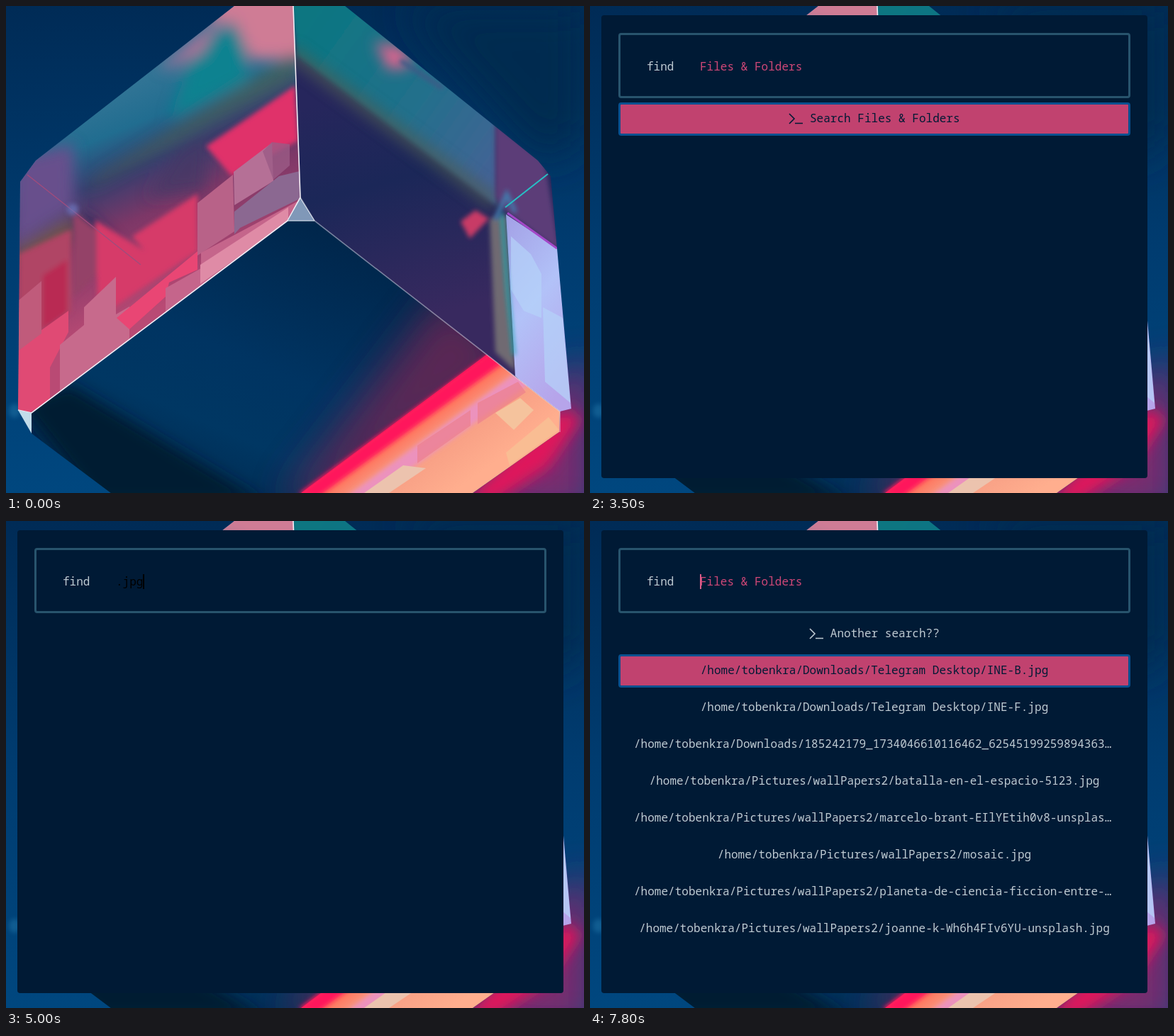
These frames come from a looping animation (815x687 px, 8 s). An HTML page:

```html
<!DOCTYPE html>
<html lang="en">
<head>
<meta charset="utf-8">
<title>File search menu</title>
<style>
  html, body { margin: 0; width: 815px; height: 687px; overflow: hidden; background: #00315f; }
  body { position: relative; font: 500 16.04px/22px "Noto Sans Mono", "DejaVu Sans Mono", monospace; white-space: pre; }
  .wall, .menu, .menu > * { position: absolute; }
  .wall { left: 0; top: 0; }
  .edge { fill: none; stroke: #f4eef6; stroke-width: 1.6; }

  .menu, .empty, .typed, .caret, .search, .results, .first, .second { animation: 8s step-end infinite; }
  .menu { left: 16px; top: 13px; width: 770px; height: 653px; border-radius: 4px; background: #001a35; color: #bfcad2; animation-name: open; }
  .field { box-sizing: border-box; left: 24px; top: 25px; width: 722px; height: 92px; border: 3px solid #28546d; border-radius: 4px; }
  .label { left: 64px; top: 61px; }
  .empty { left: 139px; top: 61px; color: #cf4777; animation-name: empty; }
  .caret { position: absolute; left: 0; top: 1px; width: 1.5px; height: 21px; background: #d95c88; animation-name: blink; }
  .typed { left: 139px; top: 61px; height: 22px; overflow: hidden; color: #000; animation-name: type; }
  .typed::after { content: ""; position: absolute; right: 0; top: 1px; width: 2px; height: 21px; background: #000; }

  .row { box-sizing: border-box; width: 722px; height: 47px; margin-bottom: 5px; border: 3px solid transparent; border-radius: 4px; line-height: 38px; text-align: center; }
  .cut { padding-left: 19px; text-align: left; }
  .row svg { width: 20px; height: 16px; vertical-align: -3px; fill: none; stroke: currentColor; stroke-width: 1.6; }
  .search, .results { left: 24px; top: 123px; }
  .search { animation-name: search; }
  .search .row, .first { border-color: #05508f; background: #c1426f; color: #001a35; }
  .results { animation-name: list; }
  .first { animation-name: leave; }
  .second { animation-name: enter; }

  @keyframes open { 0% { opacity: 0 } 16.25%, 100% { opacity: 1 } }
  @keyframes empty { 0%, 56.25%, 83.75%, 100% { opacity: 1 } 52.5%, 57.5% { opacity: 0 } }
  @keyframes search { 0%, 56.25% { opacity: 1 } 52.5%, 57.5%, 100% { opacity: 0 } }
  @keyframes blink { 0%, 47.5%, 100% { opacity: 1 } 43.75% { opacity: 0 } }
  @keyframes type {
    0%, 56.25%, 83.75%, 100% { opacity: 0; width: 0 }
    52.5%, 57.5% { opacity: 1; width: calc(1ch + 2px) }
    61.25% { opacity: 1; width: calc(3ch + 2px) }
    62.5% { opacity: 1; width: calc(4ch + 2px) }
  }
  @keyframes list { 0% { opacity: 0 } 83.75%, 100% { opacity: 1 } }
  @keyframes leave { 97.5%, 100% { border-color: transparent; background: none; color: #bfcad2 } }
  @keyframes enter { 97.5%, 100% { border-color: #05508f; background: #c1426f; color: #001a35 } }
</style>
</head>
<body>
<svg class="wall" width="815" height="687" viewBox="0 0 815 687">
  <defs>
    <linearGradient id="sky" x2="0" y2="1">
      <stop stop-color="#002b56"/><stop offset=".5" stop-color="#003c70"/><stop offset="1" stop-color="#00477f"/>
    </linearGradient>
    <linearGradient id="leftBase" gradientUnits="userSpaceOnUse" x1="170" y1="80" x2="300" y2="390">
      <stop stop-color="#3a7898"/><stop offset=".25" stop-color="#216d90"/>
      <stop offset=".42" stop-color="#343e6f"/><stop offset=".62" stop-color="#7c3767"/><stop offset="1" stop-color="#b94a74"/>
    </linearGradient>
    <linearGradient id="rightBase" gradientUnits="userSpaceOnUse" x1="500" y1="120" x2="590" y2="440">
      <stop stop-color="#26265c"/><stop offset=".4" stop-color="#1b2758"/><stop offset="1" stop-color="#38295f"/>
    </linearGradient>
    <linearGradient id="tealBand" gradientUnits="userSpaceOnUse" x1="420" y1="20" x2="700" y2="220">
      <stop stop-color="#0b7681"/><stop offset=".55" stop-color="#21708b"/><stop offset="1" stop-color="#436395"/>
    </linearGradient>
    <linearGradient id="glass" x2=".4" y2="1">
      <stop stop-color="#a3a0e6"/><stop offset=".5" stop-color="#b2c2f8"/><stop offset="1" stop-color="#b6a4ea"/>
    </linearGradient>
    <linearGradient id="floor" gradientUnits="userSpaceOnUse" x1="420" y1="300" x2="250" y2="690">
      <stop stop-color="#00264b"/><stop offset=".5" stop-color="#003462"/><stop offset=".75" stop-color="#003763"/><stop offset="1" stop-color="#002a50"/>
    </linearGradient>
    <linearGradient id="warm" gradientUnits="userSpaceOnUse" x1="550" y1="585" x2="625" y2="690">
      <stop stop-color="#ff1b5c"/><stop offset=".2" stop-color="#ff765f"/><stop offset=".4" stop-color="#f69c83"/><stop offset="1" stop-color="#ffae8e"/>
    </linearGradient>
    <filter id="soft2" x="-50%" y="-50%" width="200%" height="200%"><feGaussianBlur stdDeviation="3"/></filter>
    <filter id="soft9" x="-50%" y="-50%" width="200%" height="200%"><feGaussianBlur stdDeviation="10"/></filter>
    <filter id="soft30" x="-80%" y="-80%" width="260%" height="260%"><feGaussianBlur stdDeviation="28"/></filter>
    <clipPath id="leftFace"><path d="M322 0H405L415 270 397 303 36 574 17 570 20 248 42 218Z"/></clipPath>
    <clipPath id="rightFace"><path d="M405 0H478L750 218 768 240 797 568 781 572 435 303 415 270Z"/></clipPath>
    <clipPath id="floorFace"><path d="M397 303H435L781 572 780 601 658 687H148L36 603V574Z"/></clipPath>
  </defs>

  <rect width="815" height="687" fill="url(#sky)"/>
  <path d="M560 0H815V180L760 220Z" fill="#00294f" filter="url(#soft30)"/>
  <path d="M770 530L830 500V720H640Z" fill="#7b2a6e" filter="url(#soft30)"/>
  <path d="M784 570L812 580 765 650 690 700H640Z" fill="#e0175c" filter="url(#soft9)"/>
  <ellipse cx="12" cy="571" rx="8" ry="10" fill="#2c83b4" opacity=".4" filter="url(#soft2)"/>

  <g clip-path="url(#leftFace)">
    <rect width="420" height="600" fill="url(#leftBase)"/>
    <g filter="url(#soft9)">
      <path d="M270 50L335 20 340 105 230 160Z" fill="#0f8290"/>
      <path d="M290 -30H425V75L345 75 325 25 290 25Z" fill="#cf7b95"/>
      <path d="M215 90L305 15 275 65 235 85Z" fill="#b97099"/>
      <path d="M412 62L130 240 110 262 412 100Z" fill="#51604e" opacity=".6"/>
      <path d="M412 100L240 205 200 270 280 260 285 195 412 112Z" fill="#443766" opacity=".7"/>
      <path d="M10 215L95 195 97 285 10 340Z" fill="#67508c"/>
      <path d="M15 340L95 295V330L15 370Z" fill="#75603f" opacity=".7"/>
      <path d="M110 290L160 340 90 330Z" fill="#252c5c"/>
    </g>
    <path d="M282 198L408 112 412 190 318 240Z" fill="#e0326a" filter="url(#soft2)"/>
    <g filter="url(#soft2)">
      <path d="M126 302L195 345 178 325 270 265V346L130 440Z" fill="#d63a69"/>
      <path d="M18 350L92 315V430L18 480Z" fill="#b04465"/>
      <path d="M52 380L86 358V432L52 455Z" fill="#b92b53"/>
      <path d="M95 290L128 315V380L95 410Z" fill="#944367"/>
    </g>
    <path d="M18 480L88 430V460L62 510V560L17 580Z" fill="#e04a74"/>
    <path d="M18 415L50 388V462L18 486Z" fill="#c05b7b"/>
    <path d="M76 478L110 450V425L155 382V435L174 424V470L76 545Z" fill="#c76a8c"/>
    <path d="M156 440L270 346V372L230 390 225 410 174 456Z" fill="#e94674"/>
    <path d="M270 278L320 238 322 318 270 352Z" fill="#b86288"/>
    <path d="M321 234L375 193 377 247 322 281Z" fill="#b57096"/>
    <path d="M322 290L385 240 414 233V272L330 313 322 322Z" fill="#8b6891"/>
    <path d="M362 205L375 192 400 195V225L377 245Z" fill="#9b5c86" opacity=".8"/>
    <path d="M225 398L275 370V348L322 323 414 274V305L225 440Z" fill="#c5658b"/>
    <path d="M274 365L398 284V304L274 392Z" fill="#df8ba6"/>
    <path d="M30 238L92 287 190 365" fill="none" stroke="#a04c7c" stroke-width="1.5"/>
    <circle cx="94" cy="287" r="8" fill="#6a72b8" opacity=".8" filter="url(#soft2)"/>
  </g>

  <g clip-path="url(#rightFace)">
    <path d="M400 0H800V580H400Z" fill="url(#rightBase)"/>
    <path d="M400 -10H490L692 160V282L410 70Z" fill="url(#tealBand)" filter="url(#soft2)"/>
    <path d="M400 64L690 278" stroke="#4d5c55" stroke-width="20" opacity=".75" filter="url(#soft9)"/>
    <path d="M520 50L560 60 572 84 540 90Z" fill="#e3638f" filter="url(#soft9)"/>
    <path d="M556 77L616 116" stroke="#3c5a86" stroke-width="6" filter="url(#soft2)"/>
    <path d="M690 165L760 220 780 345 705 290 690 270Z" fill="#5b3c78" filter="url(#soft2)"/>
    <path d="M682 300L706 295 718 515 690 488Z" fill="#706b72" filter="url(#soft2)"/>
    <path d="M641 304L662 288 681 300 654 328Z" fill="#c83a66" filter="url(#soft2)"/>
    <path d="M705 294L778 342 802 590H790L718 522Z" fill="url(#glass)"/>
    <path d="M712 325L740 350 755 378V440L730 430 712 400ZM757 425L785 440 796 560 760 530Z" fill="#b5d3fa" opacity=".7"/>
    <path d="M699 292L707 400 716 492" fill="none" stroke="#16a6af" stroke-width="4" filter="url(#soft2)"/>
    <path d="M707 292L777 342" stroke="#a347c8" stroke-width="3"/>
    <path d="M690 302L706 265 718 291" fill="none" stroke="#4379ac" stroke-width="6" filter="url(#soft2)"/>
    <path d="M704 284L764 237" stroke="#27bfc5" stroke-width="2"/>
  </g>

  <g clip-path="url(#floorFace)">
    <rect y="300" width="800" height="390" fill="url(#floor)"/>
    <path d="M620 400L730 500 450 700H390Z" fill="#6b2555" opacity=".85" filter="url(#soft30)"/>
    <path d="M20 560L90 535 365 700H130Z" fill="#001a31" filter="url(#soft9)"/>
    <path d="M412 690L680 490 800 570V610L660 690Z" fill="url(#warm)"/>
    <path d="M412 688L680 491 700 503 440 692Z" fill="#ff195b" filter="url(#soft2)"/>
    <path d="M480 692L718 518 740 532 515 692Z" fill="#ec92bd" filter="url(#soft2)"/>
    <path d="M505 687L560 648 592 652 540 687Z" fill="#ecc3ae"/>
    <path d="M580 620L655 570V592L580 645ZM665 560L722 530 733 545 665 590Z" fill="#ed7f8b" opacity=".65"/>
    <path d="M690 574L725 553 744 570 716 598Z" fill="#f5c39d"/>
    <path d="M705 630L765 580 780 598 710 648Z" fill="#f9bd93"/>
  </g>

  <path class="edge" d="M405 0L415 270 397 303 36 574 17 570"/>
  <path class="edge" d="M415 270L435 303 781 572V601" stroke-opacity=".45"/>
  <path d="M415 271L435 303H397Z" fill="#8098b8" stroke="#e8edf4"/>
  <path d="M17 570L36 574V603Z" fill="#c2dcea"/>
</svg>

<div class="menu"><div class="field"></div><div class="label">find</div><div class="empty">Files &amp; Folders<i class="caret"></i></div><div class="typed">.jpg</div><div class="search"><div class="row"><svg viewBox="0 0 20 16"><path d="M1 1L8 8 1 15M9 14.5H20"/></svg> Search Files &amp; Folders</div></div><div class="results"><div class="row first"><svg viewBox="0 0 20 16"><path d="M1 1L8 8 1 15M9 14.5H20"/></svg> Another search??</div><div class="row second">/home/tobenkra/Downloads/Telegram Desktop/INE-B.jpg</div><div class="row">/home/tobenkra/Downloads/Telegram Desktop/INE-F.jpg</div><div class="row cut">/home/tobenkra/Downloads/185242179_1734046610116462_62545199259894363…</div><div class="row">/home/tobenkra/Pictures/wallPapers2/batalla-en-el-espacio-5123.jpg</div><div class="row cut">/home/tobenkra/Pictures/wallPapers2/marcelo-brant-EIlYEtih0v8-unsplas…</div><div class="row">/home/tobenkra/Pictures/wallPapers2/mosaic.jpg</div><div class="row cut">/home/tobenkra/Pictures/wallPapers2/planeta-de-ciencia-ficcion-entre-…</div><div class="row">/home/tobenkra/Pictures/wallPapers2/joanne-k-Wh6h4FIv6YU-unsplash.jpg</div></div></div>
</body>
</html>
```
